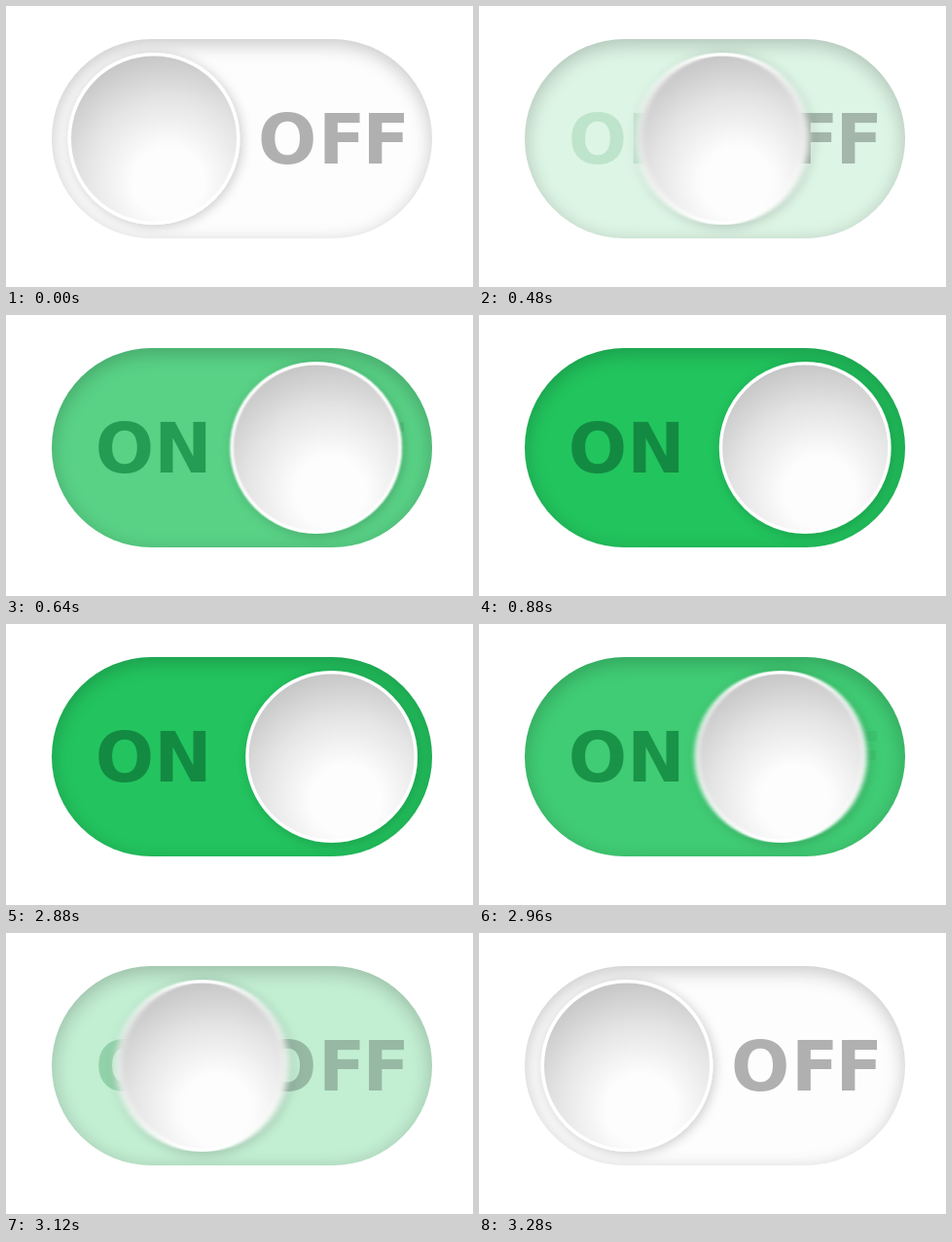
These frames come from a looping animation (480x289 px, 3.8 s). An HTML page:

```html
<!DOCTYPE html>
<html lang="en">
<head>
<meta charset="utf-8">
<title>Toggle switch</title>
<style>
  html, body { margin: 0; width: 100%; height: 100%; overflow: hidden; background: #fff; }
  #pill {
    position: absolute; left: 46.5px; top: 33.5px; width: 391px; height: 205.5px;
    border-radius: 103px; box-shadow: inset 0 5px 20px rgba(0, 0, 0, .22);
  }
  svg { position: absolute; left: 0; top: 0; }
  text { font: bold 71px "DejaVu Sans", sans-serif; }
</style>
</head>
<body>
<div id="pill"></div>
<svg width="480" height="289">
  <defs>
    <radialGradient id="dish" gradientUnits="userSpaceOnUse" cx="15" cy="45" r="145">
      <stop offset=".25" stop-color="#fdfdfd"/>
      <stop offset=".6" stop-color="#e4e4e4"/>
      <stop offset="1" stop-color="#bebebe"/>
    </radialGradient>
    <filter id="shadow" x="-20%" y="-20%" width="140%" height="140%">
      <feDropShadow dx="2" dy="2" stdDeviation="6" flood-opacity=".2"/>
    </filter>
    <filter id="smear" x="-20%" y="-20%" width="140%" height="140%" color-interpolation-filters="sRGB">
      <feGaussianBlur id="blur" stdDeviation="0 0"/>
    </filter>
  </defs>
  <text id="on" x="91.8 152.3" y="162" fill="#138a42">ON</text>
  <text id="off" x="259 321 366.5" y="162" fill-opacity=".3">OFF</text>
  <g id="knob" filter="url(#smear)">
    <circle r="86.7" fill="url(#dish)" stroke="#fff" stroke-width="3.4" filter="url(#shadow)"/>
  </g>
</svg>
<script>
  const LOOP = 3800, STEP = 40, LEFT = 152, RIGHT = 335.2, SHUTTER = 20;
  const WHITE = [253, 253, 253], GREEN = [34, 196, 94];
  const $ = id => document.getElementById(id);
  const ramp = (t, start, length) => Math.min(1, Math.max(0, (t - start) / length));
  const easeInOut = p => (1 - Math.cos(Math.PI * p)) / 2;
  const easeOut = p => 1 - (1 - p) ** 3.1;

  const switchBack = t => easeInOut(ramp(t, 2866, 390));
  const tint = t => easeInOut(ramp(t, 383, 386)) - switchBack(t);
  const knobX = t => LEFT + (RIGHT - LEFT) * (easeOut(ramp(t, 370, 500)) - switchBack(t));

  function draw(t) {
    const level = tint(t);
    const color = WHITE.map((w, i) => w + (GREEN[i] - w) * level);
    $("pill").style.backgroundColor = `rgb(${color})`;
    $("on").setAttribute("opacity", level);
    $("off").setAttribute("opacity", 1 - level);

    const travel = Math.abs(knobX(t + SHUTTER / 2) - knobX(t - SHUTTER / 2));
    $("blur").setAttribute("stdDeviation", `${travel / Math.sqrt(12)} 0`);
    $("knob").setAttribute("transform", `translate(${knobX(t)} 136.5)`);
  }

  const begin = performance.now();
  function tick() {
    const t = (performance.now() - begin) % LOOP;
    draw(Math.floor(t / STEP) * STEP);
    requestAnimationFrame(tick);
  }
  tick();
</script>
</body>
</html>
```
